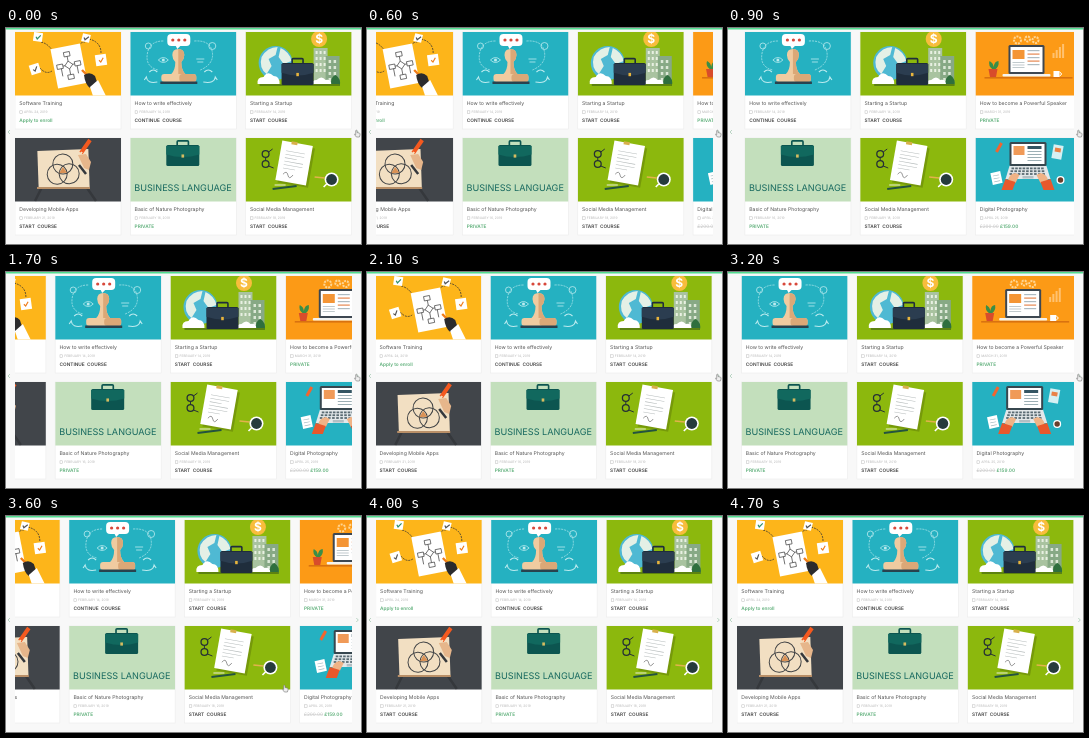
An HTML page that plays this animation: 355x216 px, repeating every 4.8 s.

```html
<!DOCTYPE html>
<html lang="en">
<head>
<meta charset="utf-8">
<title>Course carousel</title>
<style>
  html, body { margin: 0; width: 100%; height: 100%; overflow: hidden; background: #f8f8f8; }
  svg { display: block; width: 100%; height: 100%; }
  text { font-family: Inter, "Open Sans", sans-serif; text-rendering: geometricPrecision; }
  .title { font-size: 5.15px; fill: #555; }
  .date { font-size: 3.3px; fill: #b5b5b5; }
  .action { font-size: 4.75px; font-weight: 600; fill: #444; }
  .green { fill: #5cae78; }
  .nav { fill: none; stroke: #a9cbb5; stroke-width: .8; }
</style>
</head>
<body>
<svg viewBox="0 0 355 216">
  <clipPath id="view"><rect x="9" y="2" width="337" height="214"/></clipPath>
  <clipPath id="pic"><rect width="106" height="63.5"/></clipPath>
  <rect width="355" height="216" fill="#f8f8f8"/>
  <g clip-path="url(#view)"><g id="track"></g></g>
  <rect width="355" height="1.5" fill="#52dc90"/>
  <path class="nav" d="M4 102l-2 2 2 2M350.3 102l2 2-2 2"/>
  <path id="hand" fill="#eee" stroke="#777" stroke-width=".6"
    d="M-1.3 1.6V-2.4q.7-.8 1.3 0V-.5l2.6.7q.7.5.4 1.8L2.4 4H-.6L-2.6 1.4q.2-.9 1.3.2z"/>
</svg>
<script>
const STEP = 115.3, ROW = 106, LOOP = 4800, SLIDE = 600;

const rect = (x, y, w, h, fill, more = "") =>
  `<rect x="${x}" y="${y}" width="${w}" height="${h}" fill="${fill}" ${more}/>`;
const dot = (x, y, r, fill, more = "") => `<circle cx="${x}" cy="${y}" r="${r}" fill="${fill}" ${more}/>`;
const ring = (x, y, r, color, width = 1, more = "") =>
  dot(x, y, r, "none", `stroke="${color}" stroke-width="${width}" ${more}`);
const shape = (d, fill) => `<path d="${d}" fill="${fill}"/>`;
const line = (d, color, width = 1, more = "") =>
  `<path d="${d}" fill="none" stroke="${color}" stroke-width="${width}" ${more}/>`;
const text = (x, y, cls, s) => `<text x="${x}" y="${y}" class="${cls}">${s}</text>`;
const turn = (angle, x, y, body) => `<g transform="translate(${x} ${y}) rotate(${angle})">${body}</g>`;
const repeat = (n, draw) => Array.from({ length: n }, (_, i) => draw(i)).join("");
const dashes = 'stroke-dasharray="2 1"';

const briefcase = (x, y, w, h, body, flap, clasp) =>
  rect(x + w * .33, y - h * .2, w * .34, h * .4, "none", `stroke="${body}" stroke-width="${w * .05}" rx="1"`) +
  rect(x, y, w, h, body, 'rx="1.5"') +
  shape(`M${x} ${y + 1}h${w}v${h * .4}q${-w / 2} ${h * .25} ${-w} 0z`, flap) +
  rect(x + w * .46, y + h * .45, w * .08, h * .15, clasp);

const software = () => {
  const note = (x, y, angle, size, mark) =>
    turn(angle, x, y, rect(-size / 2, -size / 2, size, size, "#fff") + line("M-2 0l1.5 2 3-4", mark, 1.2));
  const box = (x, y) => rect(x - 3, y - 2.2, 6, 4.4, "#fff", 'stroke="#444" stroke-width=".7"');
  return line("M26 10Q34 12 38 20M25 36Q31 43 37 39M62 16Q65 10 70 10M74 7Q86 10 86 21", "#333", .8, dashes) +
    note(23, 5, 8, 9, "#2f8f6b") + note(20, 37, -18, 10, "#555") +
    note(71, 6, 14, 8, "#555") + note(86, 28, -8, 11, "#ef7d1b") +
    turn(-11, 54, 34, rect(-15, -20, 30, 40, "#fff") +
      line("M0-12V12M-8-1H8M-8-1V9M8-1V9", "#444", .7) +
      box(0, -12) + box(-9, -1) + box(9, -1) + box(0, 11) +
      shape("M0-5l4 4-4 4-4-4z", "#fff") + line("M0-5l4 4-4 4-4-4z", "#444", .7)) +
    line("M67 38L73 44", "#ef7d1b", 2.4) +
    shape("M69 43q6-4 11 1l2 6-7 6q-5-4-6-13z", "#2b2b2d") +
    shape("M75 55l8-7 8 16H78z", "#fff");
};

const stamp = () =>
  rect(37, 2, 23, 12, "#fff", 'rx="4"') + shape("M45 13h6l-4 4z", "#fff") +
  repeat(3, i => dot(42.5 + i * 6, 8, 1.6, "#d8483b")) +
  line("M33 9Q19 9 17 22T28 38M64 9Q80 8 82 20T70 38", "#bcebef", .7, dashes) +
  ring(18, 14, 3, "#bcebef", .8) + ring(82, 14, 3.5, "#bcebef", .8) +
  line("M28 28q5-5 10 0-5 5-10 0zM66 27h8M67 30h6", "#bcebef", .8) + dot(33, 28, 1.5, "#bcebef") +
  line("M27 50q-10 2-11-5l-2 3M19 40q4-4 8 0M73 50q11 2 12-5l2 3M74 40q4-4 8 0", "#bcebef", 1.1) +
  shape("M42 23q0-6 6-6t6 6q0 4-3 7 0 8 4 12H41q4-4 4-12-3-3-3-7z", "#f0cba0") +
  shape("M48 17q6 0 6 6 0 4-3 7 0 8 4 12h-7z", "#dba877") +
  rect(31, 42, 35, 8, "#f0cba0", 'rx="3"') + rect(49, 42, 17, 8, "#dba877", 'rx="3"') +
  rect(30, 49.5, 37, 2.5, "#28424e");

const startup = () =>
  rect(68, 16, 14, 37, "#a9c3a0") + rect(80, 24, 14, 29, "#87a985") +
  repeat(12, i => rect(70 + i % 3 * 4, 19 + Math.floor(i / 3) * 6, 2, 3, "#e8f0e2")) +
  repeat(8, i => rect(83 + i % 2 * 5, 28 + Math.floor(i / 2) * 6, 2.5, 3, "#dce8d7")) +
  dot(30, 31, 17, "#4fb9d3") +
  shape("M16 25q6-10 16-10l-2 8-7 4 3 7-5 8q-8-6-5-17zM35 16q9 4 11 13l-8 3-5-7z", "#e4f0e6") +
  shape("M12 52q-1-7 6-7 4-7 10-1 6 0 6 8z", "#fff") +
  shape("M66 53q0-5 5-5 5-5 9 0 6-1 6 5z", "#fff") +
  shape("M86 54q-2-9 4-11 6 4 4 11z", "#2f6f3e") +
  rect(14, 52, 80, 2, "#5d8210") +
  briefcase(36, 31, 32, 22, "#1f2d3c", "#2b3d50", "#e9b53c") +
  dot(73.5, 7, 8, "#f8bd3c") +
  '<text x="73.5" y="11.3" text-anchor="middle" font-size="12" font-weight="700" fill="#fff">$</text>';

const speaker = () => {
  const gear = (x, y, r) => ring(x, y, r, "#ffd694", 2, dashes);
  return gear(42, 8, 3.5) + gear(52, 7, 2.5) + gear(60, 8, 3) +
    repeat(4, i => rect(77 + i * 3.2, 21 - i * 3, 2, 5 + i * 3, "#ffc271")) +
    rect(9, 45, 88, 1.6, "#d9720f") +
    rect(33, 13, 36, 29, "#3d4751", 'rx="1.5"') + rect(35, 15, 32, 25, "#fff") +
    rect(37, 18, 12, 9, "#f49535") + repeat(5, i => rect(52, 18 + i * 3.5, 12, 1.2, i % 2 ? "#e68852" : "#aebbc1")) +
    repeat(3, i => rect(37, 30 + i * 2.5, 12, 1, "#c1cacd")) +
    rect(27, 42, 48, 2.6, "#f3f3f1", 'rx="1"') +
    shape("M18 38q-6-4-4-9 4 2 4 6 1-6 5-6 1 6-4 9z", "#3b8e47") +
    shape("M13 37h9l-1.5 8h-6z", "#d84c2b") +
    rect(78, 39, 6, 6, "#fff") + line("M84 40q4 2 0 4", "#fff");
};

const mobile = () =>
  line("M28 47L20 63M70 47L81 63", "#35383c", 2.5) +
  turn(-2, 48, 31, rect(-25, -19, 51, 38, "#f2dfc2") +
    ring(0, -5, 10, "#424446") + ring(-6, 5, 10, "#424446") + ring(6, 5, 10, "#424446") +
    shape("M0-2l4 6H-4z", "#d99155")) +
  rect(22, 49, 53, 2, "#b98f67") +
  line("M66 15L75 2", "#f4591f", 4) + line("M64 18l3-4", "#f7dfbd", 2) +
  shape("M63 17l8-1 5 8-2 8-5-2z", "#e6b68b") + line("M64 27l7 9", "#35383c", 2.5);

const language = () =>
  briefcase(36, 7, 33, 21, "#0c5550", "#11685e", "#d6bc60") +
  '<text x="4" y="53.4" font-size="9.1" fill="#17695f">BUSINESS LANGUAGE</text>';

const social = () =>
  turn(10, 48.5, 25, rect(-13, -18, 31, 40, "#76990a") + rect(-15.5, -20, 31, 40, "#fff") +
    repeat(6, i => rect(-10, -11 + i * 3.5, i % 3 == 2 ? 12 : 19, .6, "#b4baba")) +
    line("M-9 13q3-5 5 0t5-1", "#777", .7) + rect(-6, -21, 6, 3, "#d8b04c")) +
  ring(20, 16, 3.4, "#263135", 1.3) + ring(20, 26, 3.4, "#263135", 1.3) +
  line("M20 19.5v3M23 14l4-3M23 28l5 2", "#263135", 1) +
  line("M27 51l24-3", "#24533f", 2.2) + line("M29 47l11 0", "#e9eed5", 1) +
  line("M69 39l10 1", "#e2b24c", 1.6) +
  dot(86, 41.5, 7, "#fff") + dot(86, 41.5, 5.4, "#263b3c") + line("M81 46l-3 3", "#fff", 1.6);

const photo = () =>
  line("M21 14l5-9", "#f2652f", 3) +
  turn(-12, 21, 40, rect(-5, -6, 10, 12, "#fff") + repeat(3, i => rect(-3, -3 + i * 3, 6, .7, "#a4bcc2"))) +
  turn(10, 82, 14, rect(-5, -7, 10, 14, "#d5f0f3") + rect(-3, -4, 6, 4, "#e98146")) +
  rect(34, 4, 37, 24, "#37474f", 'rx="1.5"') + rect(36, 6, 33, 20, "#fff") +
  rect(38, 8, 11, 9, "#f09a58") + rect(52, 8, 14, 3, "#345563") +
  repeat(4, i => rect(52, 13 + i * 3, 14, 1, "#9cafb5")) +
  shape("M34 28h37l4 13H30z", "#e3e8ea") +
  repeat(3, r => repeat(9, c => rect(36 - r + c * (3.7 + r * .2), 29.5 + r * 2.8, 2.6, 1.8, "#5a6b73"))) +
  rect(47, 38, 11, 2.5, "#b2bfc4") +
  shape("M32 44q1-8 8-9l4 2-4 8z", "#f0b386") + shape("M73 44q-1-8-8-9l-4 2 4 8z", "#f0b386") +
  shape("M30 41l10 3-3 8H26z", "#e8582c") + shape("M75 41l-10 3 3 8h11z", "#e8582c") +
  dot(85, 42, 4, "#fff") + dot(85, 42, 2.7, "#693f2c");

const START = "START&#160; COURSE";
// background, drawing, title, date, action, green action; two cards per column
const cards = [
  ["#fdb51a", software, "Software Training", "APRIL 24, 2019", "Apply to enroll", 1],
  ["#41454a", mobile, "Developing Mobile Apps", "FEBRUARY 21, 2019", START],
  ["#25b1c1", stamp, "How to write effectively", "FEBRUARY 14, 2019", "CONTINUE&#160; COURSE"],
  ["#c3dfbc", language, "Basic of Nature Photography", "FEBRUARY 16, 2019", "PRIVATE", 1],
  ["#8cb80d", startup, "Starting a Startup", "FEBRUARY 14, 2019", START],
  ["#8cb80d", social, "Social Media Management", "FEBRUARY 18, 2019", START],
  ["#fc9a16", speaker, "How to become a Powerful Speaker", "MARCH 31, 2019", "PRIVATE", 1],
  ["#25b1c1", photo, "Digital Photography", "APRIL 25, 2019",
    '<tspan fill="#c4c4c4" font-weight="400" text-decoration="line-through">£200.00</tspan> £159.00', 1],
];

const card = ([back, draw, title, date, action, green], i) =>
  `<g transform="translate(${9 + (i >> 1) * STEP} ${4 + i % 2 * ROW})">` +
  rect(0, 0, 106, 97, "#fff", 'stroke="#ececec" stroke-width=".6"') +
  `<g clip-path="url(#pic)">${rect(0, 0, 106, 64, back)}${draw()}</g>` +
  text(4.3, 73, "title", title) +
  rect(4.8, 78.8, 2.6, 2.5, "none", 'stroke="#bbb" stroke-width=".5"') +
  text(9, 81.3, "date", date) +
  text(4.3, 90, green ? "action green" : "action", action) + "</g>";

const track = document.getElementById("track");
const hand = document.getElementById("hand");
track.innerHTML = cards.map(card).join("");

// cubic-bezier(.25, .1, .25, 1)
function ease(x) {
  if (x <= 0) return 0;
  if (x >= 1) return 1;
  let lo = 0, hi = 1, u;
  for (let i = 0; i < 20; i++) {
    u = (lo + hi) / 2;
    if (.75 * u * (1 - u) + u ** 3 < x) lo = u; else hi = u;
  }
  return .3 * u * (1 - u) ** 2 + 3 * u * u * (1 - u) + u ** 3;
}

// forward and rewind clicks alternate
const clicks = [492, 1566, 2750, 3433];

function frame() {
  const t = Math.floor(performance.now() % LOOP / 100) * 100;
  const shift = clicks.reduce((sum, at, i) => sum + (i % 2 ? -1 : 1) * ease((t - at) / SLIDE), 0);
  track.setAttribute("transform", `translate(${-STEP * shift} 0)`);
  const k = Math.min(1, Math.max(0, (t - 3400) / 200));
  hand.setAttribute("transform", `translate(${351 - 72 * k} ${105 + 67 * k})`);
  hand.style.display = t < 4000 ? "" : "none";
  requestAnimationFrame(frame);
}
frame();
</script>
</body>
</html>
```
